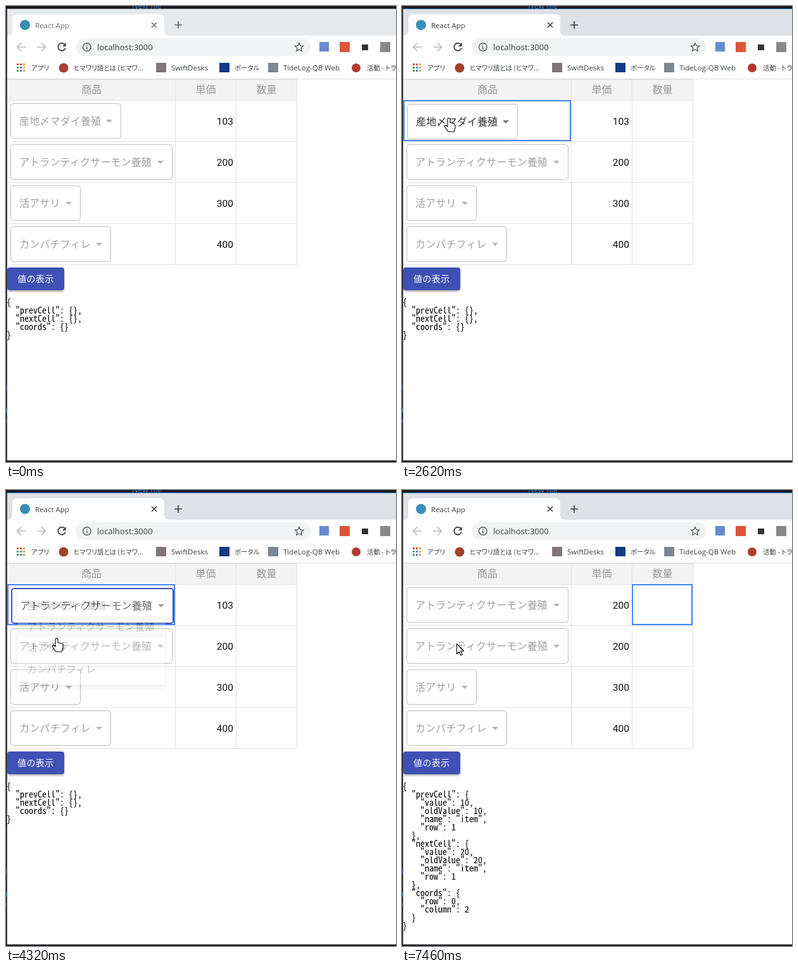
Write an HTML page that moves like this. It is 616 by 722 pixels and loops after 7.99 s.

```html
<!DOCTYPE html>
<html lang="ja">
<head>
<meta charset="utf-8">
<title>React App</title>
<style>
  html, body { margin: 0; height: 100%; overflow: hidden; background: #fff; }
  svg { display: block; width: 616px; height: 722px; }
  text { font: 16px "Noto Sans CJK JP", "Noto Sans CJK", sans-serif; white-space: pre; }
  .item { font-weight: 300; letter-spacing: .15px; }
  .head { fill: #999; text-anchor: middle; font-weight: 300; }
  .price { font: 15.5px Roboto, "Open Sans", sans-serif; text-anchor: end; fill: #111; }
  .ui { font: 11.5px "Open Sans", "Noto Sans CJK JP", sans-serif; fill: #3c4043; }
  .url { font-size: 13px; }
  .kana { font: 10.5px "Noto Sans CJK JP", "Noto Sans CJK", sans-serif; font-feature-settings: "palt"; fill: #3c4043; }
  .button { font-size: 14px; font-weight: 500; letter-spacing: .4px; fill: #fff; }
  .code { font: 14px "Noto Sans Mono CJK JP", monospace; fill: #000; }
  .paper { filter: drop-shadow(0 4px 4px #0003) drop-shadow(0 2px 6px #0002); }
  .raised { filter: drop-shadow(0 2px 1.5px #0005); }
  .line { fill: none; stroke-width: 1.7; }
</style>
</head>
<body>
<svg viewBox="0 0 616 722">
  <g id="window"></g>
  <g id="page"></g>
  <g id="pointer"></g>
</svg>
<script>
const LOOP = 7990;
const ACTIVATE = 1610, SELECT = 1770, EDIT = 2550, FOCUS = 3000, COMMIT = 5260;
const MENU_OPEN = 2970, MENU_CLOSE = 4195, FADE = 267, GROW = 178;
const ITEMS = ["産地〆マダイ養殖", "アトランティクサーモン養殖", "活アサリ", "カンパチフィレ"];
const COLUMNS = [267.5, 363.5, 459.5];
const ROW_HEIGHT = 65;

const layer = id => document.getElementById(id);
const rect = (x, y, w, h, fill, rest = "") =>
  `<rect x="${x}" y="${y}" width="${w}" height="${h}" fill="${fill}" ${rest}/>`;
const circle = (x, y, r, fill) => `<circle cx="${x}" cy="${y}" r="${r}" fill="${fill}"/>`;
const text = (x, y, string, cls, rest = "") => `<text x="${x}" y="${y}" class="${cls}" ${rest}>${string}</text>`;
const line = (d, color, rest = "") => `<path class="line" d="${d}" stroke="${color}" ${rest}/>`;

// cubic-bezier(.4, 0, .2, 1)
function ease(x) {
  if (x <= 0) return 0;
  if (x >= 1) return 1;
  let low = 0, high = 1, u = .5;
  for (let i = 0; i < 20; i++) {
    u = (low + high) / 2;
    const at = 1.2 * u * (1 - u) ** 2 + .6 * u * u * (1 - u) + u ** 3;
    if (at < x) low = u; else high = u;
  }
  return 3 * u * u - 2 * u ** 3;
}

function drawWindow(active) {
  const ink = active ? "#3c4043" : "#6b6f73";
  const arrow = (x, dir) => line(`M${x - 7 * dir} 65H${x + 6 * dir}M${x} 58.5L${x + 6.5 * dir} 65L${x} 71.5`, "#b8babd");
  const dots = ["#d9503f", "#d9503f", "#e8a33a", "#4a9c5a", "#4a7fd6", "#e8a33a", "#4a9c5a", "#4a7fd6", "#e8a33a"]
    .map((color, i) => rect(17 + i % 3 * 5, 91 + Math.floor(i / 3) * 5, 3, 3, color)).join("");
  return rect(0, 0, 616, 722, "#fff")
    + rect(0, 4, 616, 43, active ? "#dee1e6" : "#e7eaed")
    + rect(0, 0, 616, 4.5, "#1d1920")
    + text(199, 4, "New file", "ui", 'style="fill:#3584d6;font-size:12.5px"')
    + (active ? rect(0, 4, 616, 1, "#1a78bd") : "")
    + `<path d="M2 47Q10 47 10 39V21Q10 13 18 13H242Q250 13 250 21V39Q250 47 258 47Z" fill="#fff"/>`
    + circle(30, 30, 8, "#3c8db5")
    + text(46, 34.5, "React App", "ui", `style="fill:${ink}"`)
    + line("M230 26L238 34M238 26L230 34", ink)
    + line("M266 30H278M272 24V36", ink)
    + arrow(24, -1) + arrow(56, 1)
    + line("M93 61A6 6 0 1 0 94 66.5", "#4a4d51", 'style="stroke-width:2"')
    + `<path d="M94.8 58V64H88.8Z" fill="#4a4d51"/>`
    + rect(110, 51, 371, 28, "#f1f3f4", 'rx="14"')
    + line("M121.5 65a6.3 6.3 0 1 0 12.6 0a6.3 6.3 0 1 0-12.6 0M127.8 64V69M127.8 61V62.6", "#54575b", 'style="stroke-width:1.4"')
    + text(144, 70, "localhost:3000", "ui url")
    + line("M463 58.5L465 63L469.6 63.4L466.1 66.5L467.2 71.2L463 68.7L458.8 71.2L459.9 66.5L456.4 63.4L461 63Z", "#5f6368", 'style="stroke-width:1.4"')
    + rect(495, 57, 15, 15, "#668bd0") + rect(527, 57, 16, 16, "#dc5539")
    + rect(562, 61, 10, 9, "#333") + rect(591, 57, 16, 16, "#8a8786")
    + dots + text(40, 102, "アプリ", "kana")
    + circle(91, 98, 7.5, "#a3412c") + text(107, 102, "ヒマワリ語とは (ヒマワ...", "kana")
    + rect(237, 90, 16, 15, "#80757b") + text(261, 102, "SwiftDesks", "ui")
    + rect(337, 90, 16, 15, "#103b87") + text(361, 102, "ポータル", "kana")
    + rect(414, 90, 16, 15, "#7c8791") + text(438, 102, "TideLog-QB Web", "ui")
    + circle(553, 98, 7, "#b13b2d") + text(570, 102, "活動 - トラック", "kana")
    + rect(2, 115, 614, 1, "#dadce0")
    + rect(0, 4, 1.7, 718, "#1d1920") + rect(0, 719.5, 616, 3, "#1d1920")
    + rect(0, 600, 1.7, 8, "#31539a") + rect(0, 637, 1.7, 7, "#277aa8") + rect(0, 654, 1.7, 6, "#31539a");
}

function selectBox(row, item, editing, focused) {
  const shift = editing ? 1 : 0;
  const x = 7.5 + shift, y = 154.5 + row * ROW_HEIGHT + shift;
  const width = Math.floor(45.4 + 16.15 * ITEMS[item].length);
  const border = focused
    ? `stroke="#3f51b5" stroke-width="2" transform="translate(.5 .5)"` : `stroke="#bdbdbd"`;
  return rect(x, y, width, 55, "#fff", `rx="4" ${border}`)
    + text(x + 13.5, y + 33.5, ITEMS[item], "item", `fill="${editing ? "#333" : "#a0a0a0"}"`)
    + `<path d="M${x + width - 23.5} ${y + 25.5}h10l-5 5z" fill="${editing ? "#757575" : "#b5b5b5"}"/>`;
}

const selection = (left, right) =>
  rect(left, 150, right - left, 63, "none", 'stroke="#4285f4" stroke-width="2"');

function drawMenu(t, hovered) {
  if (t < MENU_OPEN || t > MENU_CLOSE + FADE) return "";
  let age = t - MENU_OPEN, opacity = ease(age / FADE), grown = ease(age / GROW);
  if (t >= MENU_CLOSE) {
    age = t - MENU_CLOSE;
    opacity = 1 - ease(age / FADE);
    grown = 1 - ease((age - FADE + GROW) / GROW);
  }
  const scale = `${.75 + .25 * grown} ${.5625 + .4375 * grown}`;
  return `<g opacity="${opacity}" transform="translate(19 183) scale(${scale}) translate(-19 -183)">`
    + rect(18, 157, 242, 160, "#fff", 'rx="4" class="paper"')
    + rect(18, 165 + 36 * hovered, 242, 36, "#e6e6e6")
    + ITEMS.map((name, i) => text(34, 188.5 + 36 * i, name, "item", 'fill="#222"')).join("")
    + "</g>";
}

function drawPage(t, hovered) {
  const committed = t >= COMMIT, editing = t >= EDIT && !committed;
  const cell = value => ({ value, oldValue: value, name: "item", row: 1 });
  const state = committed
    ? { prevCell: cell(10), nextCell: cell(20), coords: { row: 0, column: 2 } }
    : { prevCell: {}, nextCell: {}, coords: {} };
  const prices = [committed ? 200 : 103, 200, 300, 400];
  const rules = COLUMNS.map(x => `M${x} 116V410`).join("")
    + [116.5, 149.5, 214.5, 279.5, 344.5, 409.5].map(y => `M2 ${y}H460`).join("");

  let out = rect(2, 116, 458, 33, "#f3f3f3")
    + line(rules, "#e2e2e2", 'style="stroke-width:1"')
    + text(135, 137.5, "商品", "head") + text(315.5, 137.5, "単価", "head") + text(411.5, 137.5, "数量", "head");
  prices.forEach((price, row) => {
    out += selectBox(row, row === 0 && committed ? 1 : row)
      + text(359, 188 + row * ROW_HEIGHT, price, "price");
  });
  if (editing) {
    out += rect(3, 151, 263, 62, "#fff") + selectBox(0, t >= MENU_CLOSE ? 1 : 0, true, t >= FOCUS);
  }
  if (committed) out += selection(364, 458);
  else if (t >= SELECT) out += selection(3, 266);

  out += rect(2, 414, 90, 36, "#3f51b5", 'rx="4" class="raised"') + text(18, 437, "値の表示", "button");
  JSON.stringify(state, null, 2).split("\n").forEach((row, i) => {
    out += text(1, 473.5 + 13 * i, row, "code");
  });
  return out + drawMenu(t, hovered);
}

const SHAPES = {
  arrow: "M.5 .5V16.5L4.3 13L6.8 18.7L9.2 17.6L6.7 12H11.7Z",
  plus: "M-3-7H3V-3H7V3H3V7H-3V3H-7V-3H-3Z",
  hand: "M-2 2Q-2 .5 0 .5T2 2V7.5L8 9Q10 9.5 10 12V16L8 22H-1L-6 15Q-7.5 12.5-6 12T-2 14Z"
};
// [end time, shape]
const SHAPE_TIMES = [[ACTIVATE, "arrow"], [EDIT, "plus"], [4560, "hand"], [5960, "plus"], [6330, "hand"], [LOOP, "arrow"]];
// [time, x, y]
const TRAIL = [
  [70, 421, 624], [270, 115, 297], [500, 115, 297], [590, 127, 290], [1290, 74, 177],
  [1610, 72, 177], [2500, 72, 177], [2550, 74, 177], [3700, 74, 177], [4100, 80, 234],
  [4400, 80, 234], [4480, 90, 245], [4600, 90, 245], [4720, 110, 325], [4880, 220, 300],
  [5120, 402, 184], [5400, 402, 184], [6040, 48, 438], [6290, 48, 438], [6440, 150, 500],
  [6560, 182, 600], [6720, 90, 697], [6870, 15, 560], [7060, 10, 308], [7460, 86, 243], [LOOP, 86, 243]
];

function pointerAt(t) {
  const i = Math.max(1, TRAIL.findIndex(point => point[0] > t));
  const [t0, x0, y0] = TRAIL[i - 1], [t1, x1, y1] = TRAIL[i];
  const part = Math.max(0, (t - t0) / (t1 - t0));
  return [x0 + (x1 - x0) * part, y0 + (y1 - y0) * part];
}

function drawPointer(t, x, y) {
  if (t < TRAIL[0][0]) return "";
  const shape = SHAPE_TIMES.find(([end]) => t < end)[1];
  return `<path transform="translate(${Math.round(x)} ${Math.round(y)})" d="${SHAPES[shape]}"
    fill="#fff" stroke="#000" stroke-width="${shape === "plus" ? 1.6 : 1.1}" stroke-linejoin="round"/>`;
}

function update(id, markup) {
  const node = layer(id);
  if (node.markup !== markup) node.innerHTML = node.markup = markup;
}

function frame(now) {
  const t = now % LOOP;
  const [x, y] = pointerAt(t);
  update("window", drawWindow(t >= ACTIVATE));
  update("page", drawPage(t, y > 201 ? 1 : 0));
  update("pointer", drawPointer(t, x, y));
  requestAnimationFrame(frame);
}
frame(0);
</script>
</body>
</html>
```
